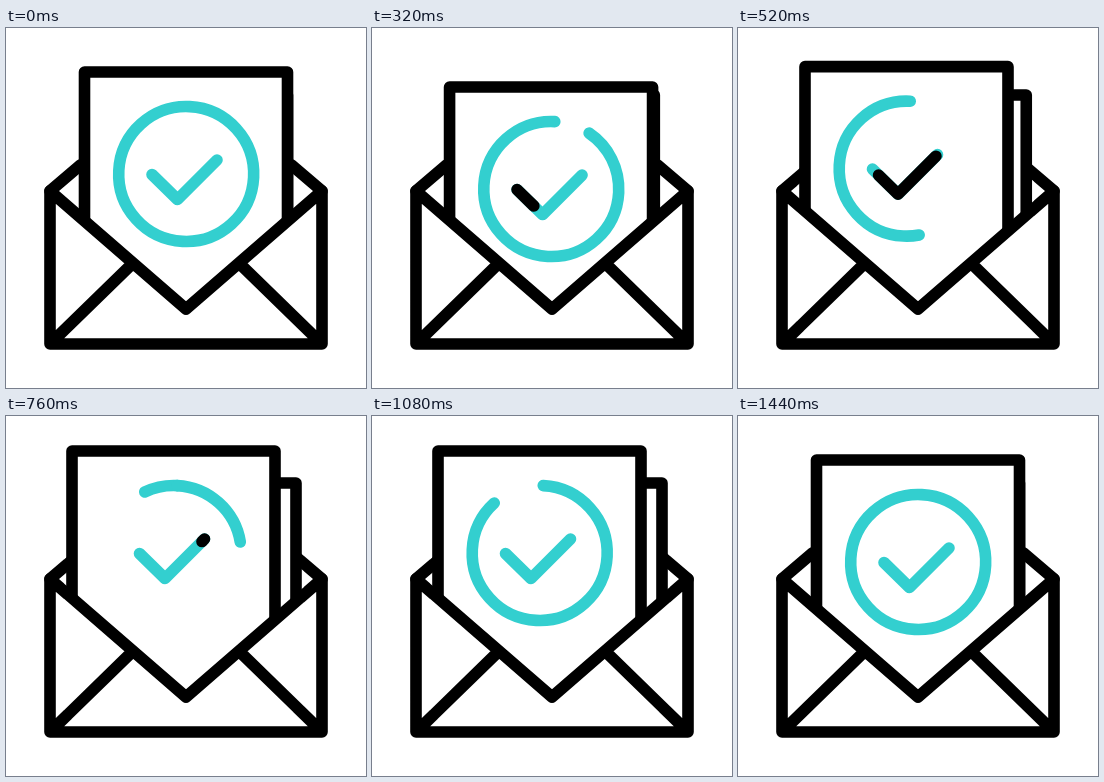
An HTML page that plays this animation: 360 px wide and 360 px high, repeating every 1480 ms.

```html
<!DOCTYPE html>
<html lang="en">
<head>
<meta charset="utf-8">
<title>Confirmed mail</title>
<style>
  html, body { margin: 0; width: 100%; height: 100%; overflow: hidden; background: #fff; }
  svg { display: block; width: 100vw; height: 100vh; }
  .line { fill: none; stroke: #000; stroke-width: 11.6; stroke-linecap: round; stroke-linejoin: round; }
  .sheet { fill: #fff; }
  .teal { stroke: #33cfcf; }
</style>
</head>
<body>
<svg viewBox="0 0 360 360">
  <path class="line" d="M44 163L74.5 137M316 163L285.5 137"/>
  <path id="back" class="line sheet" d="M180 67H281.5V270H180"/>
  <g id="front">
    <path class="line sheet" d="M78.5 280V44H281.5V280"/>
    <g transform="rotate(3 180.2 146)">
      <path id="oldRing" class="line teal" pathLength="1" d="M180.2 78.5a67.5 67.5 0 0 1 0 135a67.5 67.5 0 0 1 0 -135"/>
      <path id="newRing" class="line teal" pathLength="1" d="M180.2 78.5a67.5 67.5 0 0 1 0 135a67.5 67.5 0 0 1 0 -135"/>
    </g>
    <path class="line teal" d="M146 146.5L171.5 171.5L211 132"/>
    <path id="sweep" class="line" pathLength="1" d="M146 146.5L171.5 171.5L211 132"/>
  </g>
  <path fill="#fff" d="M44 163L180 281L316 163V316H44Z"/>
  <path class="line" d="M44 163V316H316V163L180 281ZM47 313L125 237M313 313L235 237"/>
</svg>
<script>
  const LOOP = 1480, STEP = 40;
  const $ = id => document.getElementById(id);
  const [back, front, oldRing, newRing, sweep] =
    ['back', 'front', 'oldRing', 'newRing', 'sweep'].map($);

  // Eased 0..1 progress between two times
  const ease = (t, from, to) => {
    const u = Math.min(1, Math.max(0, (t - from) / (to - from)));
    return (1 - Math.cos(Math.PI * u)) / 2;
  };

  const move = (el, x, y) => el.setAttribute('transform', `translate(${x} ${y})`);

  // Show only the part of a path between two fractions
  const trim = (el, from, to) => {
    const len = to - from;
    el.style.display = len > 0.001 ? '' : 'none';
    el.style.strokeDasharray = len > 0.999 ? 'none' : `${len} 2`;
    el.style.strokeDashoffset = -from;
  };

  function draw(t) {
    const home = ease(t, 1080, 1360);
    const x = 0.8 * ease(t, 120, 240) - 13.3 * ease(t, 240, 580) + 12.5 * home;
    const y = 16 * ease(t, 120, 280) - 25 * ease(t, 280, 600) + 9 * home;
    move(front, x, y);

    const slide = 8.5 * ease(t, 240, 640) - 14.5 * ease(t, 1100, 1240) + 6 * ease(t, 1240, 1440);
    move(back, slide, 0);

    trim(oldRing, ease(t, 187, 887), 1);
    trim(newRing, 0, ease(t, 547, 1240));
    trim(sweep, ease(t, 450, 805), ease(t, 200, 555));
  }

  const start = performance.now();
  function tick() {
    const t = (performance.now() - start) % LOOP;
    draw(Math.floor(t / STEP) * STEP);
    requestAnimationFrame(tick);
  }
  tick();
</script>
</body>
</html>
```
